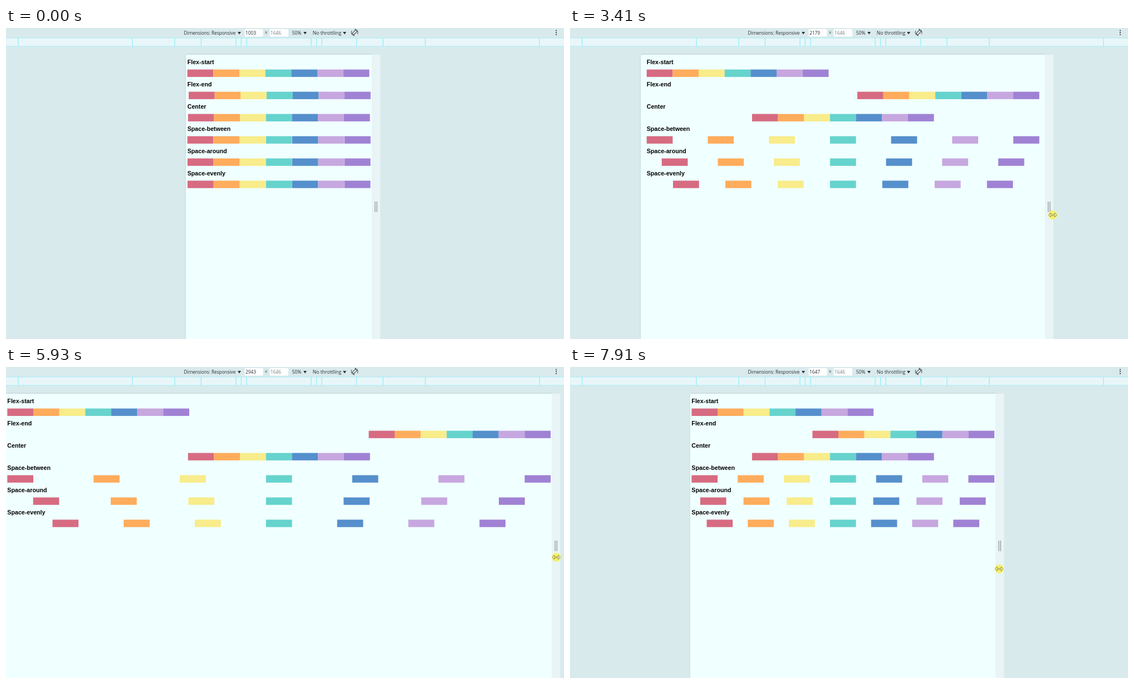
Recreate the animation shown at these times as an HTML page with a canvas. Size 1002 px wide and 559 px high, loop 8000 ms.

```html
<!DOCTYPE html>
<html lang="en">
<head>
<meta charset="utf-8">
<title>Justify-content resize demo</title>
<style>
  html, body { margin: 0; width: 100%; height: 100%; overflow: hidden; background: #d9eaed; }
  canvas { display: block; }
</style>
</head>
<body>
<canvas id="stage" width="1002" height="559"></canvas>
<script>
const ctx = document.getElementById('stage').getContext('2d');
const LOOP = 8000, GRAB = 1950, STEP = 76.4;
const CENTER = 490.2, TOP = 48, BAR_W = 140 / 3, BAR_H = 40 / 3, PITCH = 39.96;
const COLORS = ['#d76b81', '#ffac5c', '#f8ec8b', '#66d3cd', '#558fcc', '#c7a7df', '#a082d4'];
const UI_FONT = '"Open Sans", "Noto Sans", sans-serif';

// Each mode: [leading space, gap] as a share of the free space
const MODES = [
  ['Flex-start', 0, 0],
  ['Flex-end', 1, 0],
  ['Center', 1 / 2, 0],
  ['Space-between', 0, 1 / 6],
  ['Space-around', 1 / 14, 1 / 7],
  ['Space-evenly', 1 / 8, 1 / 8]
];

// Keys are [step, value], counted in screen updates from the grab
const WIDTH = [[0, 1003], [10, 1547], [21, 2317], [27, 2703], [32, 2893], [41, 2943],
  [52, 2943], [62, 2703], [70, 2091], [73, 1939], [78, 1647]];
const GRIP_X = [[0, 9.3], [10, 13.6], [27, 12.8], [41, 7.4], [52, 7.4], [70, 3.8], [78, 5.8]];
const GRIP_Y = [[0, 315], [10, 327.5], [27, 340.3], [52, 342], [70, 351], [78, 363]];
const POINTER_X = [[-25, 973], [-21, 885], [-17, 703], [-15, 678], [-9, 666], [0, 666.7]];
const POINTER_Y = [[-25, 308], [-21, 302], [-17, 317], [-15, 318], [-9, 316], [-5, 315]];

// Monotone cubic through the keys
function curve(keys, x) {
  const last = keys.length - 1;
  if (x <= keys[0][0]) return keys[0][1];
  if (x >= keys[last][0]) return keys[last][1];
  const slope = i => (keys[i + 1][1] - keys[i][1]) / (keys[i + 1][0] - keys[i][0]);
  const tangent = i => {
    if (i === 0) return slope(0) * 0.4;
    if (i === last) return slope(last - 1);
    const a = slope(i - 1), b = slope(i);
    return a * b <= 0 ? 0 : 2 * a * b / (a + b);
  };
  let i = 0;
  while (x > keys[i + 1][0]) i++;
  const h = keys[i + 1][0] - keys[i][0], u = (x - keys[i][0]) / h, v = 1 - u;
  return v * v * (1 + 2 * u) * keys[i][1] + u * u * (3 - 2 * u) * keys[i + 1][1]
    + h * u * v * (v * tangent(i) - u * tangent(i + 1));
}

const viewport = k => 1003 + 4 * Math.round((curve(WIDTH, k) - 1003) / 4);

function rect(x, y, w, h, color) {
  ctx.fillStyle = color;
  ctx.fillRect(x, y, w, h);
}

function text(str, x, y, font, color) {
  ctx.font = font;
  ctx.fillStyle = color;
  ctx.fillText(str, x, y);
}

function poly(points, fill, stroke, lineWidth) {
  ctx.beginPath();
  points.forEach(([x, y]) => ctx.lineTo(x, y));
  ctx.closePath();
  if (fill) { ctx.fillStyle = fill; ctx.fill(); }
  if (stroke) { ctx.strokeStyle = stroke; ctx.lineWidth = lineWidth; ctx.stroke(); }
}

function disc(x, y, r, color) {
  ctx.beginPath();
  ctx.arc(x, y, r, 0, 2 * Math.PI);
  ctx.fillStyle = color;
  ctx.fill();
}

function field(x, w) {
  ctx.beginPath();
  ctx.roundRect(x, 2, w, 13.5, 2);
  ctx.fillStyle = '#fff';
  ctx.fill();
}

function rotateIcon(x, y) {
  ctx.save();
  ctx.translate(x, y);
  ctx.strokeStyle = '#464a4d';
  ctx.lineWidth = 1.1;
  ctx.save();
  ctx.rotate(Math.PI / 4);
  ctx.strokeRect(-2, -4.5, 4, 9);
  ctx.restore();
  for (let side = 0; side < 2; side++) {
    ctx.beginPath();
    ctx.arc(0, 0, 5.9, -0.9, 0.55);
    ctx.stroke();
    poly([[0.2, -6.8], [3.4, -5.2], [1, -3.6]], '#464a4d');
    ctx.rotate(Math.PI);
  }
  ctx.restore();
}

function toolbar(width) {
  const dark = '#2b2f31', font = size => size + 'px ' + UI_FONT;
  text('Dimensions: Responsive', 319.6, 12, font(8.2), dark);
  field(428.5, 33);
  field(473.5, 33.5);
  text(width, 430, 12, font(8.4), dark);
  text('×', 464.2, 12.2, font(10), '#5f6669');
  text('1646', 475, 12, font(8.4), '#777b7e');
  text('50%', 513.8, 12, font(8.4), dark);
  text('No throttling', 550.8, 12, font(8.65), dark);
  for (const x of [419, 537, 608])
    poly([[x - 3, 7], [x + 3, 7], [x, 11.5]], dark);
  rotateIcon(626, 8);
  for (const y of [4.6, 8.2, 11.8]) disc(988, y, 1.1, '#3c4043');
}

function ruler() {
  rect(0, 18, 1002, 15, '#e9f6f9');
  rect(0, 17.5, 1002, 1, '#a5eef8');
  rect(0, 32.5, 1002, 1, '#a5eef8');
  for (const d of [58, 67.7, 77, 139.6, 187, 263, 468])
    for (const x of [490 - d, 490 + d]) rect(x - 0.75, 18, 1.5, 15, '#9cf0fa');
}

function page(width, contentWidth, pressed) {
  const left = CENTER - width / 6, right = CENTER + width / 6;
  ctx.save();
  ctx.shadowColor = 'rgba(0, 40, 50, 0.22)';
  ctx.shadowBlur = 3;
  rect(left, TOP, width / 3, 530, '#f0ffff');
  ctx.restore();
  rect(right, TOP, 14.6, 511, pressed ? '#dfe9ea' : '#e9f4f6');
  for (const dx of [4.6, 7.9]) rect(right + dx, 312, 1.4, 19, '#979da1');

  const x0 = CENTER - contentWidth / 6 + 8 / 3;
  const free = contentWidth / 3 - 16 / 3 - 7 * BAR_W;
  MODES.forEach(([name, lead, gap], row) => {
    const y = TOP + row * PITCH;
    text(name, x0, y + 17, 'bold 10.67px "Liberation Sans", Arial, sans-serif', '#000');
    COLORS.forEach((color, i) => {
      const x = x0 + free * lead + i * (BAR_W + free * gap);
      rect(x, y + 26.6, BAR_W, BAR_H, color);
    });
  });
}

function arrow(x, y) {
  const shape = [[0, 0], [0, 11], [2.6, 8.6], [4.4, 12.4], [6, 11.7], [4.3, 8], [7.8, 8]];
  poly(shape.map(([dx, dy]) => [x + dx, y + dy]), '#fff', '#222', 0.7);
}

function resizeCursor(x, y, pressed) {
  if (pressed) disc(x, y, 8, '#f5f06d');
  const half = [[-7.3, 0], [-3.6, -3.6], [-3.6, -1]];
  const flip = (sx, sy) => half.map(([dx, dy]) => [x + dx * sx, y + dy * sy]);
  const shape = [...flip(1, 1), ...flip(-1, 1).reverse(),
    ...flip(-1, -1), ...flip(1, -1).reverse()];
  poly(shape, pressed ? '#faf6a0' : '#fff', pressed ? '#77732c' : '#333', 0.8);
}

function cursor(t, k, right) {
  if (t < 70) return;
  if (k > 0) return resizeCursor(right + curve(GRIP_X, k), curve(GRIP_Y, k), true);
  const x = curve(POINTER_X, k), y = curve(POINTER_Y, k);
  if (k <= -15) arrow(x, y);
  else resizeCursor(x, y, t >= 1620);
}

function draw(t) {
  const k = Math.floor((t - GRAB) / STEP + 0.01);
  const width = viewport(k);
  // Page layout trails the frame while it first widens
  const contentWidth = k < 21 ? viewport(k - 0.65) : width;
  rect(0, 0, 1002, 559, '#d9eaed');
  toolbar(width);
  ruler();
  page(width, contentWidth, k === 0);
  cursor(t, k, CENTER + width / 6);
}

const start = performance.now();
function tick() {
  draw((performance.now() - start) % LOOP);
  requestAnimationFrame(tick);
}
tick();
</script>
</body>
</html>
```
